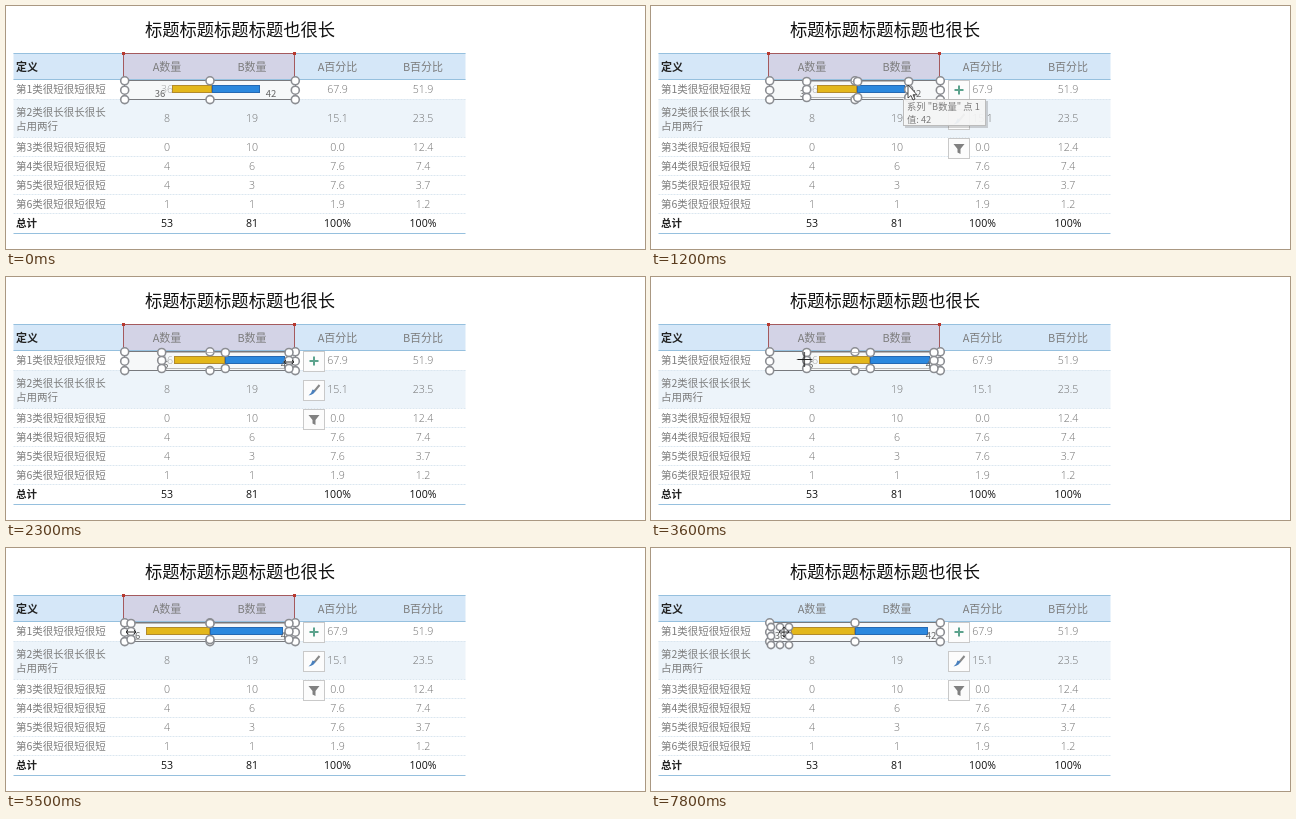
These frames come from a looping animation (639x243 px, 8000 ms). An HTML page:

```html
<!DOCTYPE html>
<html lang="zh-CN">
<head>
<meta charset="utf-8">
<title>表格与条形图</title>
<style>
html, body { margin: 0; width: 100%; height: 100%; overflow: hidden; background: #fff; }
svg { display: block; width: 639px; height: 243px; font: 300 11px "Noto Sans CJK SC", "Noto Sans CJK", "Noto Sans", sans-serif; }
text { fill: #7c7c7c; }
.mid { text-anchor: middle; }
.title { font-size: 17.3px; font-weight: 400; fill: #111; }
.label { font-size: 10.5px; }
.num { font-family: "Open Sans", "Noto Sans", sans-serif; font-size: 10.6px; fill: #707070; }
.bold { font-weight: 700; fill: #222; }
.total { font-weight: 400; fill: #111; }
.value { font-size: 9.5px; font-weight: 400; fill: #666; }
.tip text { font-size: 9.3px; font-weight: 400; }
.handle { fill: #fff; stroke: #8b8d92; stroke-width: 1.6; }

.timed { animation: 8s step-end infinite; }
#range, #rangeEdge { animation-name: range; }
#bars1 { animation-name: bars1; }
#bars2, #plot2 { animation-name: second; }
#bars3 { animation-name: bars3; }
#plot1 { animation-name: plot1; }
#plot3 { animation-name: plot3; }
#buttons { animation-name: buttons; }
#tip { animation-name: tip; }
#picked { animation-name: picked; }
#arrow { animation-name: arrow; }
#resize { animation-name: resize; }
#cross { animation-name: cross; }
#move { animation-name: move; }
#cursor { animation: travel 8s infinite; }

@keyframes range { 0% { opacity: 1 } 90% { opacity: 0 } }
@keyframes bars1 { 0% { opacity: 1 } 26.25% { opacity: 0 } }
@keyframes second { 0% { opacity: 0 } 26.25% { opacity: 1 } 61.25% { opacity: 0 } }
@keyframes bars3 { 0% { opacity: 0 } 61.25% { opacity: 1 } }
@keyframes plot1 { 0% { opacity: 0 } 10% { opacity: 1 } 26.25% { opacity: 0 } }
@keyframes plot3 { 0% { opacity: 0 } 61.25% { opacity: 1 } 90% { opacity: 0 } }
@keyframes buttons {
  0% { opacity: 0 } 7.5% { opacity: 1 } 20% { opacity: 0 }
  28.75% { opacity: 1 } 45% { opacity: 0 } 66.25% { opacity: 1 }
}
@keyframes tip { 0% { opacity: 0 } 12.5% { opacity: 1 } 18.75% { opacity: 0 } }
@keyframes picked { 0% { opacity: 0 } 90% { opacity: 1 } }
@keyframes arrow {
  0% { opacity: 0 } 1.25% { opacity: 1 } 18.75% { opacity: 0 }
  32.5% { opacity: 1 } 41.25% { opacity: 0 } 72.5% { opacity: 1 } 83.75% { opacity: 0 }
}
@keyframes resize {
  0% { opacity: 0 } 18.75% { opacity: 1 } 20% { opacity: 0 } 25% { opacity: 1 } 32.5% { opacity: 0 }
  41.25% { opacity: 1 } 45% { opacity: 0 } 63.75% { opacity: 1 } 72.5% { opacity: 0 }
}
@keyframes cross { 0% { opacity: 0 } 20% { opacity: 1 } 25% { opacity: 0 } 45% { opacity: 1 } 63.75% { opacity: 0 } }
@keyframes move { 0% { opacity: 0 } 83.75% { opacity: 1 } }
@keyframes travel {
  0% { transform: translate(448px, 57px); animation-timing-function: step-end }
  1.25% { transform: translate(448px, 57px); animation-timing-function: steps(7) }
  10% { transform: translate(246px, 79px); animation-timing-function: step-end }
  12.5% { transform: translate(257px, 79px); animation-timing-function: step-end }
  18.75% { transform: translate(259px, 84px); animation-timing-function: step-end }
  20% { transform: translate(259px, 84px); animation-timing-function: steps(4) }
  25% { transform: translate(283px, 85px); animation-timing-function: step-end }
  31.25% { transform: translate(283px, 80px); animation-timing-function: steps(8) }
  41.25% { transform: translate(156px, 83px); animation-timing-function: step-end }
  43.75% { transform: translate(156px, 83px); animation-timing-function: steps(9) }
  55% { transform: translate(135px, 83px); animation-timing-function: steps(5) }
  61.25% { transform: translate(125px, 84px); animation-timing-function: step-end }
  72.5% { transform: translate(164px, 82px); animation-timing-function: steps(2) }
  75% { transform: translate(138px, 84px); animation-timing-function: step-end }
  76.25% { transform: translate(138px, 84px); animation-timing-function: steps(4) }
  81.25% { transform: translate(127px, 85px); animation-timing-function: step-end }
  83.75% { transform: translate(130px, 86px); animation-timing-function: step-end }
  92.5% { transform: translate(130px, 86px); animation-timing-function: steps(4) }
  97.5%, 100% { transform: translate(133px, 84px); animation-timing-function: step-end }
}
</style>
</head>
<body>
<svg viewBox="0 0 639 243">
  <rect x="7.5" y="47" width="452" height="27" fill="#d5e7f8"/>
  <rect x="7.5" y="93" width="452" height="38" fill="#edf4fa"/>
  <g id="range" class="timed">
    <rect x="118" y="48" width="171" height="26" fill="#d3d3e6"/>
  </g>
  <g id="table"></g>

  <g id="rangeEdge" class="timed">
    <path d="M117.5 75V47.5H288.5V75" fill="none" stroke="#a45a5e"/>
    <path d="M116 46h3v3h-3zM287 46h3v3h-3z" fill="#b8392f"/>
  </g>
  <rect x="118.5" y="74.5" width="171" height="19" fill="#e9edf1" fill-opacity=".4" stroke="#77797d"/>
  <g id="bars"></g>
  <g id="handles"></g>

  <g id="buttons" class="timed">
    <g fill="#fcfcfc" stroke="#c9c9c9">
      <rect x="297.5" y="74.5" width="21" height="20"/>
      <rect x="297.5" y="103.5" width="21" height="20"/>
      <rect x="297.5" y="132.5" width="21" height="20"/>
    </g>
    <path d="M308 79.500v9M303.500 84h9" stroke="#5ba28c" stroke-width="2"/>
    <path d="M313.500 108l-5 6" stroke="#888" stroke-width="2"/>
    <path d="M309.500 113.500q-1 4-7 5q3-2 4-6z" fill="#4a80bd"/>
    <path d="M302.500 138h11l-4 5v5l-3-1.500v-3.500z" fill="#808080"/>
  </g>

  <g id="tip" class="tip timed">
    <rect x="254" y="95" width="83" height="27" fill="#000" opacity=".16"/>
    <rect x="252.500" y="93.500" width="82" height="26" fill="#f8f8f8" fill-opacity=".93" stroke="#bcbcbc"/>
    <text x="256" y="103.5">系列 "B数量" 点 1</text>
    <text x="256" y="116.5">值: 42</text>
  </g>

  <g id="cursor">
    <path id="arrow" class="timed" d="M0 0V13L3 10.500L5 15L7 14L5 9.800H9Z" fill="#fff" stroke="#222" stroke-width=".8"/>
    <path id="resize" class="timed" d="M-5 0H5M-3-2L-5 0L-3 2M3-2L5 0L3 2" fill="none" stroke="#333"/>
    <path id="cross" class="timed" d="M-7.500-.5H7.500M-.5-8V7" stroke="#222" stroke-width="1.200"/>
    <path id="move" class="timed" d="M-5 0H5M0-5V5M-3.500-1.500L-5 0L-3.500 1.500M3.500-1.500L5 0L3.500 1.500M-1.500-3.500L0-5L1.500-3.500M-1.500 3.500L0 5L1.500 3.500" fill="none" stroke="#333" stroke-width=".9"/>
  </g>
</svg>
<script>
const $ = id => document.getElementById(id);
const text = (x, y, s, cls) => `<text x="${x}" y="${y}" class="${cls}">${s}</text>`;
const timed = (id, body) => `<g id="${id}" class="timed">${body}</g>`;
const columns = [161, 246, 331.5, 417];
const rows = [
  [86.8, "第1类很短很短很短", "36", "42", "67.9", "51.9"],
  [116, "", "8", "19", "15.1", "23.5"],
  [144.6, "第3类很短很短很短", "0", "10", "0.0", "12.4"],
  [163.7, "第4类很短很短很短", "4", "6", "7.6", "7.4"],
  [182.8, "第5类很短很短很短", "4", "3", "7.6", "3.7"],
  [202, "第6类很短很短很短", "1", "1", "1.9", "1.2"],
  [221, "总计", "53", "81", "100%", "100%"]
];

function drawTable() {
  let out = text(234, 30.3, "标题标题标题标题也很长", "mid title") + text(10, 65.3, "定义", "bold");
  ["A数量", "B数量", "A百分比", "B百分比"].forEach((s, i) => out += text(columns[i], 65.3, s, "mid"));
  rows.forEach(([y, name, ...cells], i) => {
    const last = i === rows.length - 1;
    out += text(10, y, name, last ? "label bold" : "label");
    cells.forEach((s, c) => out += text(columns[c], y, s, last ? "mid num total" : "mid num"));
  });
  out += text(10, 110, "第2类很长很长很长", "label") + text(10, 124, "占用两行", "label");
  for (const y of [47, 73, 227])
    out += `<path d="M7.5 ${y + .5}H459.5" stroke="#96c0de"/>`;
  for (const y of [93, 131, 150, 169, 188, 207])
    out += `<path d="M7.5 ${y + .5}H459.5" stroke="#dbe7f0" stroke-dasharray="2 1"/>`;
  return out;
}

function bar(x1, x2, fill, stroke) {
  return `<rect x="${x1 + .5}" y="79.5" width="${x2 - x1 - 1}" height="7" fill="${fill}" stroke="${stroke}"/>`;
}

function barPair(id, left, split, right, ax, bx) {
  return timed(id,
    bar(left, split, "#e3b71b", "#b28a2b") + bar(split, right, "#2b88de", "#2469b3") +
    text(ax, 91, "36", "mid value") + text(bx, 91, "42", "mid value"));
}

function handles(x1, y1, x2, y2, r = 4) {
  const mx = (x1 + x2) / 2, my = (y1 + y2) / 2;
  return [x1, mx, x2].map(x => [y1, my, y2].map(y =>
    x === mx && y === my ? "" : `<circle class="handle" cx="${x}" cy="${y}" r="${r}"/>`
  ).join("")).join("");
}

function plot(id, x1, x2) {
  return timed(id, `<rect x="${x1}" y="75.5" width="${x2 - x1}" height="16" fill="none" stroke="#aaa" stroke-width=".8"/>` +
    handles(x1, 75.5, x2, 91.5));
}

$("table").innerHTML = drawTable();
$("bars").innerHTML =
  barPair("bars1", 166, 206, 254, 154, 265) +
  barPair("bars2", 168, 219, 279, 157, 280) +
  barPair("bars3", 140, 204, 277, 129, 280);
$("handles").innerHTML = handles(118.7, 74.8, 289.3, 93.6) +
  plot("plot1", 155.7, 257.7) + plot("plot2", 155.7, 283) + plot("plot3", 125, 283) +
  timed("picked", handles(120, 79, 138, 97, 3.6));
</script>
</body>
</html>
```
